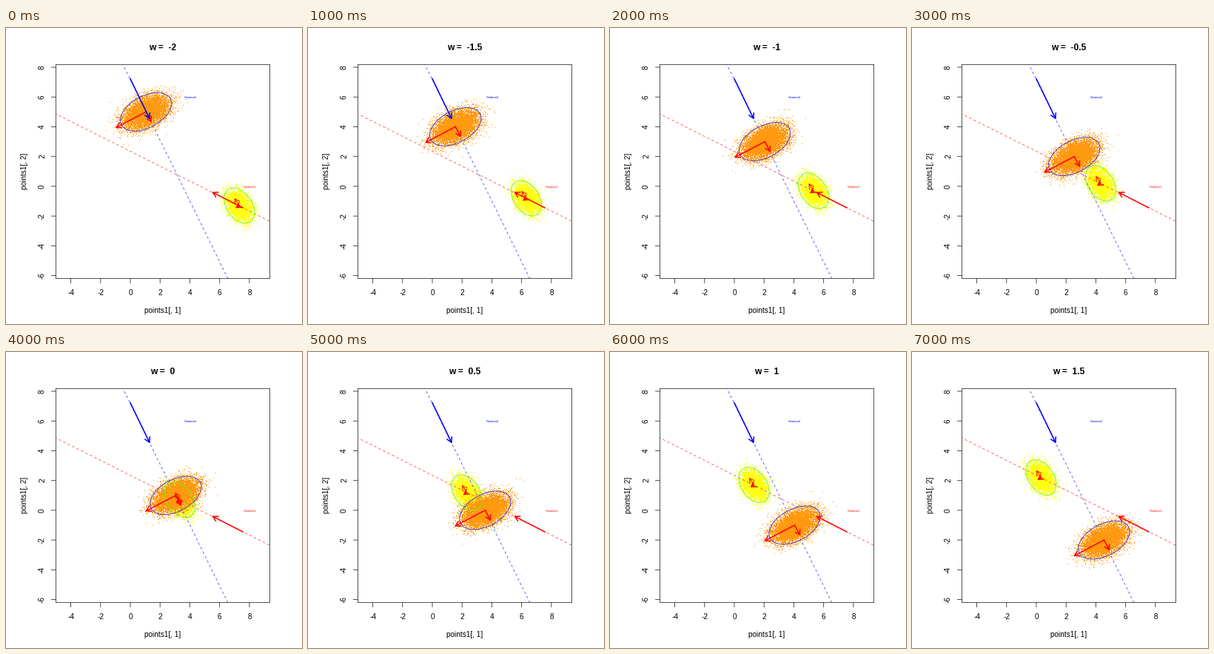
A matplotlib script that plays this animation: 400 px wide and 400 px high, repeating every 8000 ms.

```python
import numpy as np
import matplotlib.pyplot as plt
from matplotlib.animation import FuncAnimation
from matplotlib.patches import Rectangle

SIZE, DPI = 400, 100
PX = 72 / DPI                      # points per pixel
UNIT, X0, Y0 = 20.11, 168.0, 213.9   # data scale and origin in pixels
LEFT, TOP, RIGHT, BOTTOM = 67.4, 49.4, 356.6, 338.6
ORANGE, YELLOW, FRAME = "#ff9910", "#ffff12", "#333333"

plt.rcParams["font.family"] = "Liberation Sans"
plt.rcParams["lines.scale_dashes"] = False

fig = plt.figure(figsize=(SIZE / DPI, SIZE / DPI), dpi=DPI, facecolor="white")
ax = fig.add_axes([0, 0, 1, 1])


def px(x, y):
    return X0 + UNIT * x, Y0 - UNIT * y


def line(xs, ys, color=FRAME, width=0.85, z=1, **kw):
    return ax.plot(xs, ys, color=color, lw=width * PX, zorder=z, snap=False,
                   **kw)[0]


def label(x, y, s, size=10, **kw):
    return ax.text(x, y, s, fontsize=size * PX, ha="center",
                   va="center_baseline", **kw)


def upright(x, y, s):
    ax.text(x, y, s, fontsize=10 * PX, rotation=90, ha="center", va="center")


def arrow(start, end, color="red", width=1.55, head=7):
    """Shaft plus an open head with 30 degree barbs."""
    (xa, ya), (xb, yb) = start, end
    line([xa, xb], [ya, yb], color, width, 6)
    back = np.arctan2(ya - yb, xa - xb)
    barbs = back + np.radians([-30, 30])
    bx, by = xb + head * np.cos(barbs), yb + head * np.sin(barbs)
    line([bx[0], xb, bx[1]], [by[0], yb, by[1]], color, width, 6)


def cloud(rng, center, axes, angle, n, color, edge, box, z):
    """Normal sample with its 95% ellipse; all sizes in pixels."""
    c, s = np.cos(angle), np.sin(angle)
    turn = np.array([[c, -s], [s, c]])
    half = np.array(axes)[:, None]
    pts = turn @ (rng.standard_normal((2, n)) * half / 2.45)
    dots = ax.scatter(center[0] + pts[0], center[1] + pts[1], marker="s",
                      s=(0.95 * PX) ** 2, c=color, lw=0, zorder=z, snap=False)
    dots.set_clip_path(box)
    t = np.linspace(0, 2 * np.pi, 121)
    ring = turn @ (half * np.array([np.cos(t), np.sin(t)]))
    line(center[0] + ring[0], center[1] + ring[1], edge, 0.9, 5)


def guide(slope, level, color, box):
    x = np.array([-5.1, 9.5])
    if slope < -1:
        x = (np.array([8.3, -6.3]) - level) / slope
    xs, ys = px(x, level + slope * x)
    dash = line(xs, ys, color, 0.85, 3, dashes=(3.4 * PX, 3.3 * PX),
                dash_capstyle="butt", alpha=0.7)
    dash.set_clip_path(box)


def draw_axes():
    box = Rectangle((LEFT, TOP), RIGHT - LEFT, BOTTOM - TOP, fill=False,
                    ec=FRAME, lw=0.85 * PX, zorder=7, snap=False)
    ax.add_patch(box)
    for v in range(-4, 9, 2):
        x = px(v, 0)[0]
        line([x, x], [BOTTOM, BOTTOM + 6])
        label(x, 357, str(v))
    for v in range(-6, 9, 2):
        y = px(0, v)[1]
        line([LEFT - 6, LEFT], [y, y])
        upright(49, y, str(v))
    label(212, 381, "points1[, 1]")
    upright(25.5, 193.5, "points1[, 2]")
    return box


def draw(i):
    ax.clear()
    ax.set(xlim=(0, SIZE), ylim=(SIZE, 0))
    ax.axis("off")
    w = -2 + 0.5 * i
    rng = np.random.default_rng(40 + i)

    box = draw_axes()
    label(211.7, 25, f"w =  {w:g}", 12, weight="bold")

    # each cloud slides along its own dashed line
    a = px(3.32 - 2 * w, 0.7 + w)
    b = px(3.05 + w, 1 - 2 * w)
    cloud(rng, a, (26.5, 17.1), np.radians(56), 5000, YELLOW, "#66ff00", box, 2)
    guide(-0.502, 2.35, "red", box)
    guide(-2.04, 7.17, "blue", box)
    cloud(rng, b, (37.6, 21.4), np.radians(-28), 10000, ORANGE, "#4433bb", box, 4)

    arrow(a, (a[0] - 6, a[1] - 9), width=1)
    arrow(a, (a[0] - 3.7, a[1] + 2.5))
    arrow(b, (b[0] - 40, b[1] + 21))
    arrow(b, (b[0] + 7, b[1] + 13))
    arrow((320, 243), (279.6, 222.3))
    arrow((168, 68.6), (193.8, 122), "blue")
    label(329.5, 214.5, "Gamma1", 4.3, color="red", zorder=8)
    label(249, 93.5, "Gamma2", 4.3, color="blue", zorder=8)
    return []


anim = FuncAnimation(fig, draw, frames=8, interval=1000, repeat=True,
                     repeat_delay=0, init_func=lambda: [])
plt.show()
```
